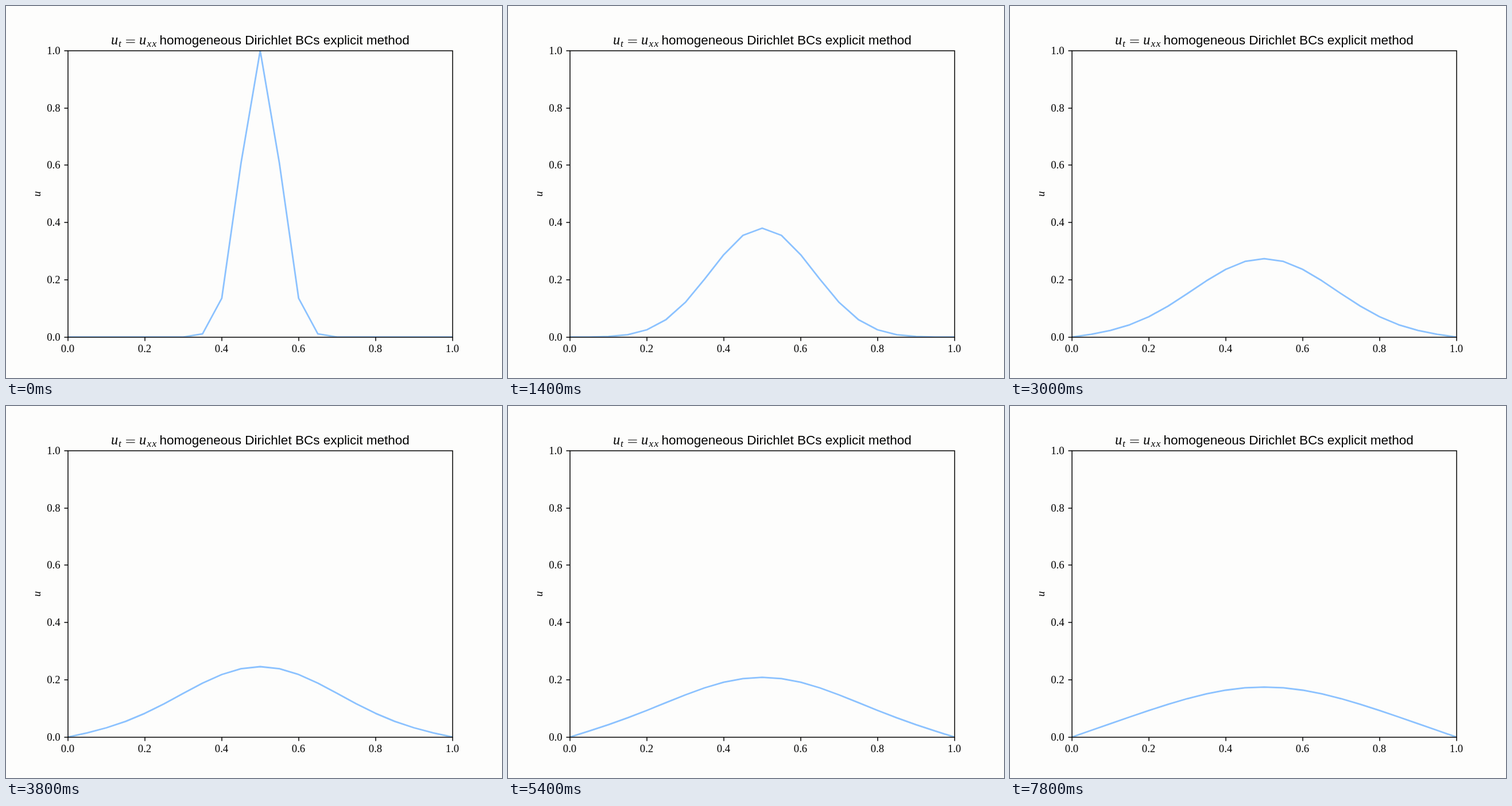
Recreate the animation shown at these times as an HTML page. Size 864x648 px, loop 8000 ms.

```html
<!DOCTYPE html>
<html lang="en">
<head>
<meta charset="utf-8">
<title>Heat equation</title>
<style>
  html, body { margin: 0; width: 100%; height: 100%; overflow: hidden; background: #fdfdfc; }
  svg { display: block; width: 864px; height: 648px; }
  text { font-family: "Liberation Serif", "Times New Roman", serif; font-size: 18.75px; }
  .sans { font-family: "Liberation Sans", Arial, sans-serif; font-size: 22.5px; }
  .var { font-style: italic; font-size: 24.5px; }
  .sub { font-style: italic; font-size: 17.5px; }
  .frame { fill: none; stroke: #000; stroke-width: 1.5; }
  .curve { fill: none; stroke: #8cc2ff; stroke-width: 2.81; stroke-linejoin: round; }
</style>
</head>
<body>
<svg viewBox="0 0 864 648">
  <clipPath id="area"><rect x="108" y="77.76" width="669.6" height="498.96"/></clipPath>
  <polyline id="curve" class="curve" clip-path="url(#area)"/>
  <rect class="frame" x="108" y="78" width="670" height="499"/>
  <g id="axes"></g>
  <text class="var" x="183" y="67">u</text>
  <text class="sub" x="196" y="70.5">t</text>
  <path d="M209.2 59.2H224.6M209.2 63.7H224.6" stroke="#000"/>
  <text class="var" x="232" y="67">u</text>
  <text class="sub" x="245.5 254.5" y="70.5">xx</text>
  <text class="sans" x="267.5" y="67">homogeneous Dirichlet BCs explicit method</text>
  <text font-style="italic" text-anchor="middle" transform="translate(60 327.2) rotate(-90)">u</text>
</svg>
<script>
const STEP_MS = 200, STEPS = 40;
const CELLS = 20, RATIO = 0.4, SIGMA = 0.05;
const px = x => 108 + 669.6 * x;
const py = u => 576.72 - 498.96 * u;

// Explicit scheme for u_t = u_xx with both ends held at zero.
const diffuse = u => u.map((v, i) =>
  i === 0 || i === CELLS ? 0 : v + RATIO * (u[i - 1] - 2 * v + u[i + 1]));

const states = [Array.from({ length: CELLS + 1 }, (_, i) =>
  Math.exp(-((i / CELLS - 0.5) ** 2) / (2 * SIGMA ** 2)))];
while (states.length < STEPS) states.push(diffuse(states.at(-1)));

const paths = states.map(u => u.map((v, i) => `${px(i / CELLS)},${py(v)}`).join(" "));

let marks = "";
for (let k = 0; k <= 5; k++) {
  const value = k / 5, label = value.toFixed(1);
  const x = Math.round(px(value)), y = Math.round(py(value));
  marks += `<path class="frame" d="M${x} 577v6.56M108 ${y}h-6.56"/>
    <text x="${x - 0.5}" y="603" text-anchor="middle">${label}</text>
    <text x="94.6" y="${y + 6.3}" text-anchor="end">${label}</text>`;
}
document.getElementById("axes").innerHTML = marks;

const curve = document.getElementById("curve");
let start, shown;
function draw(now) {
  start ??= now;
  const step = Math.floor((now - start) / STEP_MS) % STEPS;
  if (step !== shown) curve.setAttribute("points", paths[shown = step]);
  requestAnimationFrame(draw);
}
curve.setAttribute("points", paths[0]);
requestAnimationFrame(draw);
</script>
</body>
</html>
```
